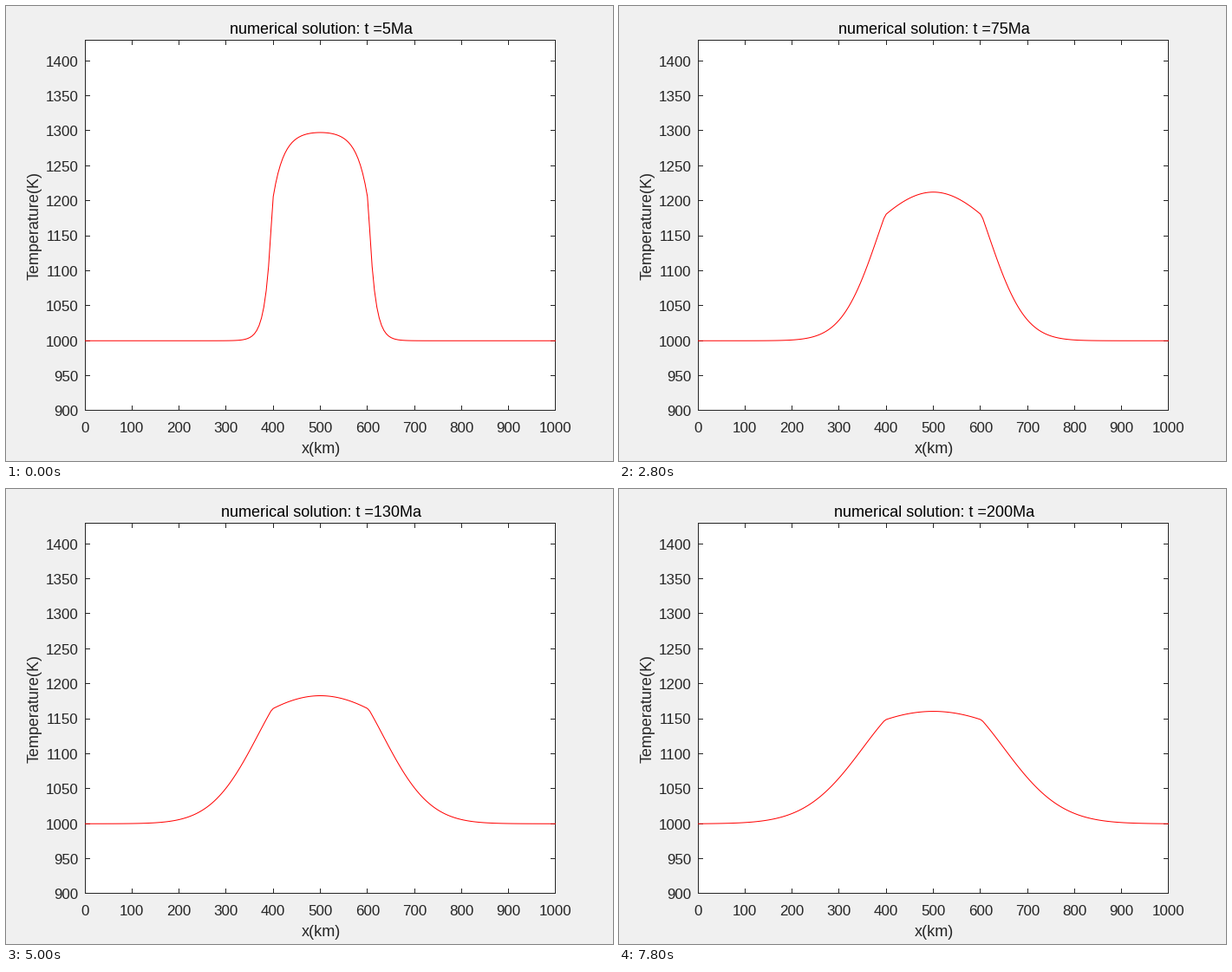
A matplotlib script for the animation above (8 s loop, 700 px wide and 525 px high).

```python
import numpy as np
import matplotlib.pyplot as plt
from matplotlib.animation import FuncAnimation
from matplotlib.patches import Rectangle

W, H, DPI = 700, 525, 100
PT = 72 / DPI                  # points per pixel
STEPS, STEP_MA = 40, 5
GREY = "#262626"
LEFT, RIGHT, TOP, BOTTOM = 91.5, 633.5, 39.5, 466.5

plt.rcParams["font.family"] = "Liberation Sans"
plt.rcParams["path.simplify"] = False


def px(x):
    return 91 + 0.543 * x


def py(temp):
    return 467 - 428 * (temp - 900) / 530


def solve_heat():
    """Implicit 1D heat conduction with a hot, more conductive middle block."""
    rho, cp = 3300, 900
    x = np.linspace(0, 1000, 201)
    dx = (x[1] - x[0]) * 1e3
    dt = STEP_MA * 1e6 * 365.25 * 86400
    inside = (x > 399.9) & (x < 600.1)
    k = np.where(inside, 10.0, 3.0)
    face = 2 * k[1:] * k[:-1] / (k[1:] + k[:-1])
    s = face * dt / (rho * cp * dx ** 2)

    a = np.eye(x.size)
    for i in range(1, x.size - 1):
        a[i, i - 1:i + 2] = -s[i - 1], 1 + s[i - 1] + s[i], -s[i]

    temp = np.where(inside, 1300.0, 1000.0)
    profiles = []
    for _ in range(STEPS):
        temp = np.linalg.solve(a, temp)
        profiles.append(temp)
    return x, profiles


x, profiles = solve_heat()

fig = plt.figure(figsize=(W / DPI, H / DPI), dpi=DPI, facecolor="#f0f0f0")
ax = fig.add_axes([0, 0, 1, 1])
ax.set_xlim(0, W)
ax.set_ylim(H, 0)
ax.axis("off")


def rule(xs, ys):
    ax.plot(xs, ys, color=GREY, lw=PT, solid_capstyle="projecting",
            snap=False, zorder=2)


def label(tx, ty, text, size, color=GREY, ha="center", rotation=0):
    return ax.text(tx, ty, text, fontsize=size * PT, color=color, ha=ha,
                   va="baseline", rotation=rotation, rotation_mode="anchor")


ax.add_patch(Rectangle((LEFT, TOP), RIGHT - LEFT, BOTTOM - TOP,
                       fc="white", ec="none", zorder=1))
rule([LEFT, RIGHT, RIGHT, LEFT, LEFT], [TOP, TOP, BOTTOM, BOTTOM, TOP])

for km in range(0, 1001, 100):
    tx = min(np.floor(px(km)) + 0.5, RIGHT)
    rule([tx, tx], [BOTTOM, BOTTOM - 5])
    rule([tx, tx], [TOP, TOP + 5])
    label(px(km), 492, str(km), 17)

for temp in range(900, 1401, 50):
    ty = min(np.floor(py(temp)) + 0.5, BOTTOM)
    rule([LEFT, LEFT + 5], [ty, ty])
    rule([RIGHT, RIGHT - 5], [ty, ty])
    label(83.5, round(py(temp) + 6.3), str(temp), 17, ha="right")

label(363, 516, "x(km)", 18)
label(38, 253.5, "Temperature(K)", 18, rotation=90)
title = label(363.5, 32, "", 18, color="black")
curve, = ax.plot([], [], color="red", lw=PT, solid_joinstyle="round",
                 solid_capstyle="butt", snap=False, zorder=3)


def update(i):
    curve.set_data(px(x), py(profiles[i]))
    title.set_text(f"numerical solution: t ={STEP_MA * (i + 1)}Ma")
    return curve, title


ani = FuncAnimation(fig, update, frames=STEPS, interval=200,
                    repeat=True, repeat_delay=0)
plt.show()
```
